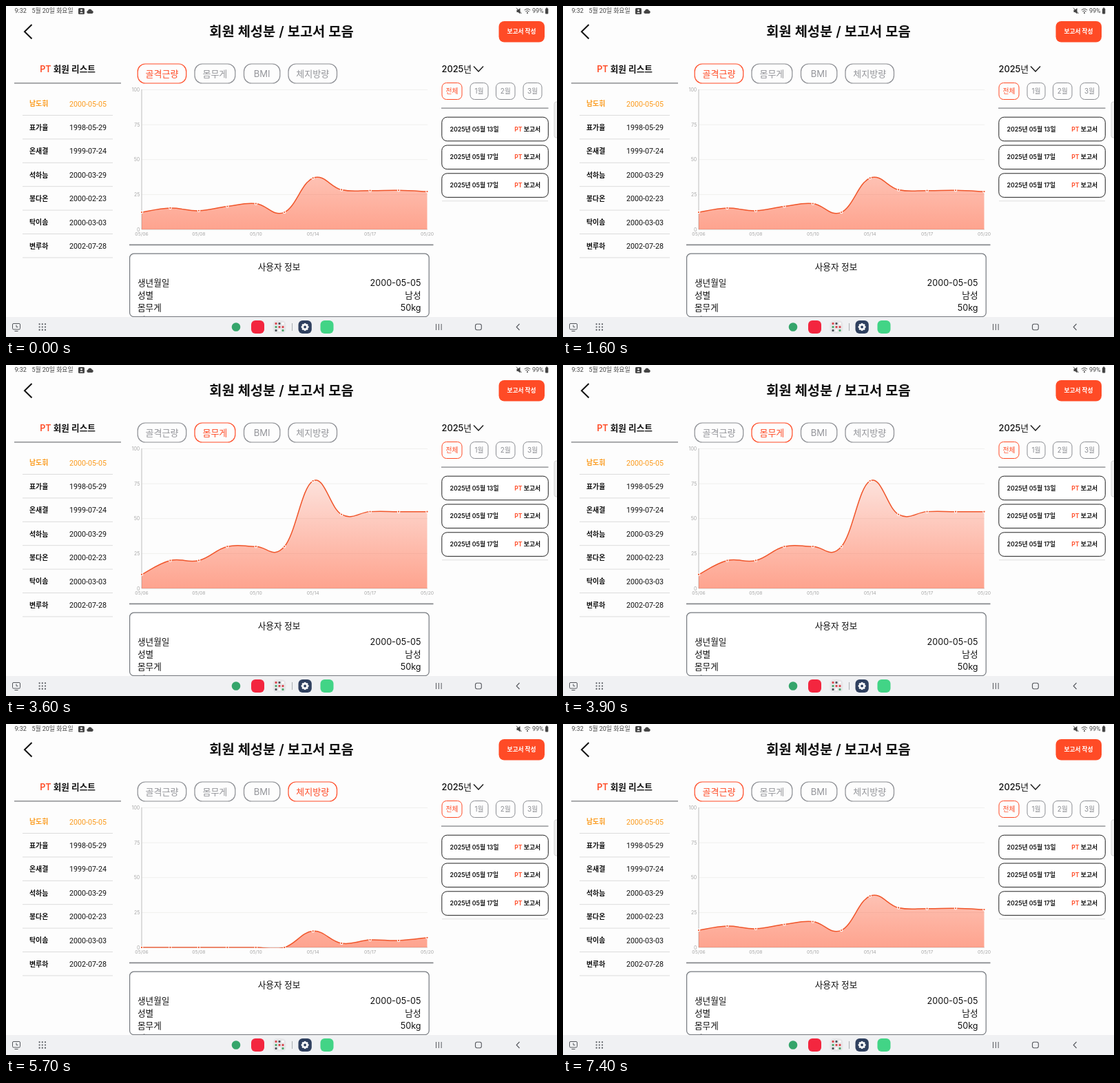
These frames come from a looping animation (800 by 480 pixels, 9200 ms). An HTML page:

```html
<!DOCTYPE html>
<html lang="ko">
<head>
<meta charset="utf-8">
<style>
  html, body { margin: 0; width: 100%; height: 100%; overflow: hidden; background: #fdfdfd; }
  svg { display: block; width: 800px; height: 480px; }
  text { font-family: Inter, "Noto Sans CJK KR", "Noto Sans CJK", sans-serif; white-space: pre; }
  .sys { font-family: Roboto, "Noto Sans CJK KR", "Noto Sans CJK", sans-serif; }
</style>
</head>
<body>
<svg id="stage" viewBox="0 0 800 480" xmlns="http://www.w3.org/2000/svg">
  <defs>
    <linearGradient id="fade" gradientUnits="userSpaceOnUse" x1="0" y1="121" x2="0" y2="324">
      <stop offset="0" stop-color="#ff5028" stop-opacity=".05"/>
      <stop offset="1" stop-color="#ff5028" stop-opacity=".52"/>
    </linearGradient>
    <clipPath id="plot"><rect x="190" y="115" width="430" height="209.7"/></clipPath>
    <clipPath id="panel"><rect x="180" y="359" width="434" height="91"/></clipPath>
  </defs>
</svg>
<script>
const stage = document.getElementById('stage');
const ORANGE = '#ff4b26', INK = '#111', GREY = '#8b8d92';
const LOOP = 9200;

function el(tag, attrs, parent = stage) {
  const node = document.createElementNS('http://www.w3.org/2000/svg', tag);
  for (const key in attrs) node.setAttribute(key, attrs[key]);
  parent.appendChild(node);
  return node;
}

// cy is the optical middle of the line
function label(str, x, cy, size, opts = {}) {
  const { fill = INK, weight = 400, anchor = 'start', sys = false, parent = stage } = opts;
  const node = el('text', {
    x, y: cy + size * 0.37, 'font-size': size, 'font-weight': weight,
    fill, 'text-anchor': anchor, class: sys ? 'sys' : ''
  }, parent);
  node.textContent = str;
  return node;
}

// Label whose leading "PT" is orange
function ptLabel(rest, x, cy, size, anchor) {
  const node = label('', x, cy, size, { weight: 600, anchor });
  el('tspan', { fill: ORANGE }, node).textContent = 'PT';
  el('tspan', {}, node).textContent = rest;
}

const line = (x1, y1, x2, y2, stroke, w = 1) =>
  el('line', { x1, y1, x2, y2, stroke, 'stroke-width': w });
const box = (x, y, width, height, rx, fill, stroke = 'none', w = 1, parent = stage) =>
  el('rect', { x, y, width, height, rx, fill, stroke, 'stroke-width': w }, parent);
const path = (d, stroke, w = 1, fill = 'none') =>
  el('path', { d, fill, stroke, 'stroke-width': w });
const dot = (cx, cy, r, fill) => el('circle', { cx, cy, r, fill });

function statusBar() {
  const c = '#444';
  label('9:32', 12.5, 7, 9, { fill: c, sys: true });
  label('5월 20일 화요일', 37.5, 7, 8.9, { fill: c, sys: true });
  box(105, 3, 9, 9, 1.5, c);
  dot(109.5, 6, 1.3, '#fff');
  path('M107 10.2q2.5-3.4 5 0z', 'none', 0, '#fff');
  path('M119 11a2.2 2.2 0 0 1 0-4.3a3.1 3.1 0 0 1 5.8-.3a2.4 2.4 0 0 1 .4 4.6z', 'none', 0, c);
  path('M741.5 5.5h2l3-2.5v8.500l-3-2.500h-2z', 'none', 0, c);
  path('M741 2.800l7.500 8.200', c, 1);
  path('M752.800 6q4.200-3.800 8.400 0M754.300 8q2.700-2.400 5.400 0', c, 1);
  dot(757, 10, 1.1, c);
  label('99%', 764, 7, 9, { fill: c, sys: true });
  box(783, 3.5, 4.300, 8, 1, c);
  box(784.200, 2.500, 2, 1.500, 0.300, c);
}

function header() {
  path('M37.500 27L27 37.300L37.500 47.500', INK, 2);
  label('회원 체성분 / 보고서 모음', 400, 37, 19.8, { weight: 600, anchor: 'middle' });
  box(715.5, 22, 66.5, 30.5, 8, ORANGE);
  label('보고서 작성', 748.5, 37, 8.7, { fill: '#fff', weight: 600, anchor: 'middle' });
}

function memberList() {
  ptLabel(' 회원 리스트', 89.5, 91, 12.6, 'middle');
  line(12, 111.8, 167, 111.8, '#77797d', 1.3);
  const members = [
    ['남도휘', '2000-05-05'], ['표가율', '1998-05-29'], ['온새결', '1999-07-24'],
    ['석하늠', '2000-03-29'], ['봉다온', '2000-02-23'], ['탁이솜', '2000-03-03'],
    ['변루하', '2002-07-28']
  ];
  members.forEach(([name, date], i) => {
    const cy = 141.7 + i * 34.4, fill = i ? INK : '#fb9a1c';
    label(name, 34, cy, 9.9, { fill, weight: 700, sys: true });
    label(date, 146, cy, 10.7, { fill, anchor: 'end', sys: true });
    line(24, cy + 16.8, 155, cy + 16.8, '#dcdcdc');
  });
}

function reports() {
  label('2025년', 632.5, 91.3, 12.8, { weight: 500 });
  path('M679 87.500L686 95L693 87.500', INK, 1.3);
  const chips = [['전체', 633, 29], ['1월', 674, 26], ['2월', 711.5, 27.5], ['3월', 751, 27]];
  chips.forEach(([str, x, w], i) => {
    const c = i ? GREY : ORANGE;
    box(x, 111.5, w, 24, 6.5, 'none', c);
    label(str, x + w / 2, 123.6, 9.8, { fill: c, weight: i ? 400 : 500, anchor: 'middle' });
  });
  line(632, 148.2, 787.5, 148.2, '#808286', 1.3);
  [13, 17, 17].forEach((day, i) => {
    const y = 161.2 + i * 40.8;
    box(632.8, y, 154.5, 34.600, 7.5, '#fff', '#222');
    label(`2025년 05월 ${day}일`, 644.5, y + 17.2, 8.75, { weight: 600 });
    ptLabel(' 보고서', 776, y + 17.2, 8.75, 'end');
  });
  line(633, 282.8, 787, 282.8, '#dedede');
  box(796, 139, 8, 52, 3, '#eee', '#d2d2d2');
}

function userInfo() {
  line(179, 346.3, 620.5, 346.3, '#85878b', 1.8);
  box(179.6, 359.2, 434.6, 91.5, 6, '#fff', '#74787e', 1.2);
  label('사용자 정보', 396.5, 378.3, 12.6, { anchor: 'middle' });
  const parent = el('g', { 'clip-path': 'url(#panel)' });
  const rows = [['생년월일', '2000-05-05'], ['성별', '남성'], ['몸무게', '50kg'], ['키', '']];
  rows.forEach(([key, value], i) => {
    const cy = 401.2 + i * 18;
    label(key, 191, cy, 12.6, { parent });
    label(value, 602.5, cy, 12.6, { anchor: 'end', parent });
  });
}

function navBar() {
  const c = '#55585d';
  box(0, 451, 800, 29, 0, '#f0f1f3');
  box(9.500, 460.500, 11, 8.500, 1.5, 'none', c);
  path('M12.500 471.500h5M15 462.500v3h2.500', c, 1);
  for (let i = 0; i < 9; i++) dot(48.6 + (i % 3) * 4.2, 461.3 + (i / 3 | 0) * 4.2, 1.1, c);

  dot(334, 465.5, 6.3, '#35a56b');
  box(356, 456, 19, 19, 6, '#f3263f');
  box(387.5, 456, 19, 19, 6, '#e6e6e8');
  const tints = ['#d8434a', '#4b5058', '#fff', '#4aa66a', '#d8434a'];
  for (let i = 0; i < 9; i++)
    box(390.5 + (i % 3) * 5, 459 + (i / 3 | 0) * 5, 3, 3, 1, tints[i % 5]);
  line(415.5, 460, 415.5, 471, '#aaadb2');

  box(424.5, 456, 19.3, 19, 6, '#2f405f');
  for (let i = 0; i < 4; i++)
    el('rect', { x: 432.7, y: 460, width: 2.8, height: 11, rx: 0.8, fill: '#fff', transform: `rotate(${i * 45} 434.1 465.5)` });
  dot(434.1, 465.5, 4.4, '#fff');
  dot(434.1, 465.5, 1.9, '#2f405f');
  box(456.5, 456, 19, 19, 6, '#42d486');

  [624.5, 628.3, 632.1].forEach(x => line(x, 461, x, 470, c));
  box(681.5, 461.3, 8.800, 8.500, 2.5, 'none', c, 1.1);
  path('M745.500 461L741.200 465.500L745.500 470', c, 1.1);
}

const X0 = 197, STEP = 41.45, BASE = 324, UNIT = 2.025;
const series = {
  muscle: [12.3, 15.3, 13.4, 16.5, 18.5, 12.3, 36.8, 28.4, 27.8, 28, 27.1],
  weight: [10, 20, 20, 30, 30, 30, 77, 53, 55, 55, 55],
  fat: [0, 0, 0, 0, 0, 0, 11.7, 3, 5.4, 5, 7]
};
const chart = {};

function buildChart() {
  for (let v = 0; v <= 100; v += 25) {
    const y = BASE - v * UNIT;
    line(X0, y, 612, y, v ? '#f0f0ee' : '#cfcfcf');
    label(String(v), 194.3, y, 7, { fill: '#a8a8a8', anchor: 'end' });
  }
  line(X0, 121, X0, BASE, '#c8c8c8', 1.2);
  ['06', '08', '10', '14', '17', '20'].forEach((day, i) =>
    label('05/' + day, X0 + i * 2 * STEP, 330.8, 6.8, { fill: '#a8a8a8', anchor: 'middle' }));

  const plot = el('g', { 'clip-path': 'url(#plot)' });
  chart.area = el('path', { fill: 'url(#fade)' }, plot);
  chart.curve = el('path', { fill: 'none', stroke: '#f0562b', 'stroke-width': 1.5 }, plot);
  chart.dots = series.muscle.map((_, i) => el('circle', {
    cx: X0 + i * STEP, r: 1.7, fill: '#f0562b', stroke: '#fff', 'stroke-width': 1.1
  }));
}

// Bezier handles run along the chord between both neighbours
function smooth(pts) {
  const at = i => pts[Math.max(0, Math.min(pts.length - 1, i))];
  const handle = (i, k) => [0, 1].map(a => at(i)[a] + (at(i + 1)[a] - at(i - 1)[a]) * k);
  return pts.map((p, i) => i
    ? `C${handle(i - 1, 0.2)} ${handle(i, -0.2)} ${p}`
    : `M${p}`).join('');
}

const tabs = [['골격근량', 191.2, 70.5], ['몸무게', 274, 58.8], ['BMI', 345.5, 52.3], ['체지방량', 410, 70.5]]
  .map(([str, x, w]) => ({ str, x, w }));

function buildTabs() {
  tabs.forEach(t => {
    t.box = box(t.x, 84, t.w, 28, 11, 'none', GREY, 1.2);
    t.text = label(t.str, t.x + t.w / 2, 98, 13, { anchor: 'middle' });
  });
}

const cues = [[0, 0, 'muscle'], [3600, 1, 'weight'], [5700, 3, 'fat'], [7400, 0, 'muscle']];
let shown = null;

function render(ms) {
  const cue = cues.filter(c => c[0] <= ms).pop();
  if (cue === shown) return;
  shown = cue;
  const [, active, key] = cue;
  tabs.forEach((t, i) => {
    const on = i === active;
    t.box.setAttribute('stroke', on ? ORANGE : GREY);
    t.text.setAttribute('fill', on ? ORANGE : '#939499');
    t.text.setAttribute('font-weight', on ? 500 : 400);
  });
  const pts = series[key].map((v, i) => [X0 + i * STEP, BASE - v * UNIT]);
  const d = smooth(pts);
  chart.curve.setAttribute('d', d);
  chart.area.setAttribute('d', `${d}V${BASE}H${X0}Z`);
  chart.dots.forEach((c, i) => c.setAttribute('cy', pts[i][1]));
}

box(0, 0, 800, 480, 0, '#fdfdfd');
statusBar();
header();
memberList();
buildTabs();
buildChart();
userInfo();
reports();
navBar();

const start = performance.now();
function tick() {
  render((performance.now() - start) % LOOP);
  requestAnimationFrame(tick);
}
tick();
</script>
</body>
</html>
```
